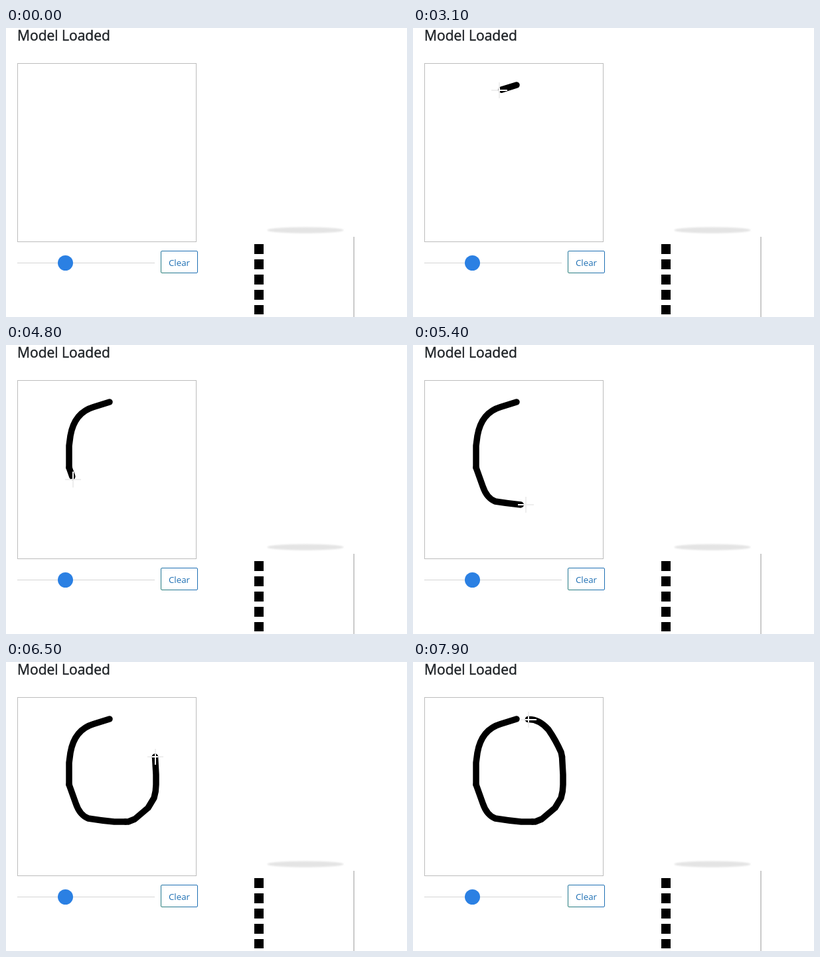
Animation, 604 px wide and 436 px high, one loop 8000 ms. Source, as an HTML page:

```html
<!DOCTYPE html>
<html lang="en">
<head>
<meta charset="utf-8">
<title>Drawing pad</title>
<style>
  html, body { margin: 0; width: 100%; height: 100%; overflow: hidden; background: #fff; }
  svg { display: block; width: 100%; height: 100%; }
  text { font-family: "Open Sans", "Noto Sans", sans-serif; }
  #ink { fill: none; stroke-width: 9.5; stroke-linecap: round; stroke-linejoin: round; }
  .cross { fill: none; stroke-width: 2; }
</style>
</head>
<body>
<svg viewBox="0 0 604 436">
  <defs>
    <linearGradient id="edge" gradientUnits="userSpaceOnUse" x1="233" y1="370" x2="258" y2="345">
      <stop offset="0" stop-color="#2b8078"/>
      <stop offset="1" stop-color="#1f70b4"/>
    </linearGradient>
    <filter id="soft" x="-10%" y="-50%" width="120%" height="200%">
      <feGaussianBlur stdDeviation="0.8"/>
    </filter>
    <g id="ink"></g>
    <mask id="onInk" maskUnits="userSpaceOnUse" x="0" y="0" width="604" height="436">
      <use href="#ink" stroke="#fff"/>
    </mask>
  </defs>

  <text x="17" y="19" font-size="21" fill="#212529" stroke="#212529" stroke-width="0.5">Model Loaded</text>
  <rect x="17.5" y="53.5" width="269" height="269" fill="#fff" stroke="#bcbcbc"/>

  <path d="M17 354.5H224" stroke="#d5d5d5"/>
  <circle cx="89.5" cy="354.5" r="11.5" fill="#2b80e3"/>
  <rect x="233.5" y="336.5" width="55" height="33" rx="1.5" fill="#fff" stroke="url(#edge)"/>
  <text x="261" y="359" font-size="13.3" text-anchor="middle" fill="#1f70b4">Clear</text>

  <ellipse cx="451" cy="305" rx="57.5" ry="4.6" fill="#e4e4e4" filter="url(#soft)"/>
  <path d="M524 315V436" stroke="#cbcbcb" stroke-width="2"/>
  <path d="M381 326V432" stroke="#000" stroke-width="14" stroke-dasharray="15 8"/>

  <path class="cross" stroke="#eee"/>
  <use href="#ink" stroke="#000"/>
  <g mask="url(#onInk)"><path class="cross" stroke="#fff"/></g>
  <path id="arrow" d="M.5 .5V16.5L4.3 13L6.8 18.5L9 17.5L6.6 12.2H11.5Z" fill="#fff" stroke="#000"/>
</svg>
<script>
  const LOOP = 8000, STEP = 100, LEAD = 45;
  const easeIn = p => u => u ** p;
  const easeOut = p => u => 1 - (1 - u) ** p;

  // The pointer approaches, then draws the ring in four strokes with pauses.
  const legs = [
    { start: 100, end: 1000, ease: easeOut(2), d: "M277 409L21 3L133 66" },
    { start: 2600, end: 4300, ease: easeIn(1.4), ink: true,
      d: "M156 86L132 93.5Q103 102 97 137L95 152V185" },
    { start: 4600, end: 5500, ease: easeIn(1.4), ink: true,
      d: "M95 185L105 213Q111 231 124 236Q142 239 163 241H180" },
    { start: 5500, end: 6500, ease: easeOut(1.4), ink: true,
      d: "M180 241H184L194 237L214 220L223 205Q226 195 226 185V170L224.5 143" },
    { start: 6800, end: 7900, ease: easeOut(1.4), ink: true,
      d: "M224.5 143L223 136Q215 118 204 102Q190 86 173.5 86.5" }
  ];

  const ink = document.getElementById("ink");
  const arrow = document.getElementById("arrow");
  const crosses = document.querySelectorAll(".cross");
  const show = (el, on) => el.setAttribute("visibility", on ? "visible" : "hidden");

  for (const leg of legs) {
    leg.path = document.createElementNS("http://www.w3.org/2000/svg", "path");
    leg.path.setAttribute("d", leg.d);
    if (leg.ink) ink.append(leg.path);
    leg.size = leg.path.getTotalLength();
  }

  function travelled(leg, t) {
    const u = (t - leg.start) / (leg.end - leg.start);
    return leg.size * leg.ease(Math.min(1, Math.max(0, u)));
  }

  function render(time) {
    const t = Math.floor(time / STEP) * STEP;
    for (const leg of legs) {
      leg.path.setAttribute("stroke-dasharray", `${travelled(leg, t)} ${leg.size + 20}`);
      show(leg.path, t >= leg.start);
    }

    const leg = legs.filter(l => l.start <= t).pop();
    const lead = leg && leg.ink ? LEAD : 0;
    const tip = leg ? leg.path.getPointAtLength(travelled(leg, t + lead)) : { x: 0, y: 0 };
    const x = Math.round(tip.x), y = Math.round(tip.y);
    const inPad = x > 17 && x < 287 && y > 53 && y < 323;
    const cross = leg && inPad ? `M${x - 12} ${y}h24M${x} ${y - 12}v24` : "";
    crosses.forEach(el => el.setAttribute("d", cross));
    show(arrow, leg && !inPad);
    arrow.setAttribute("transform", `translate(${x} ${y})`);
  }

  const origin = performance.now();
  function tick() {
    render((performance.now() - origin) % LOOP);
    requestAnimationFrame(tick);
  }
  tick();
</script>
</body>
</html>
```
